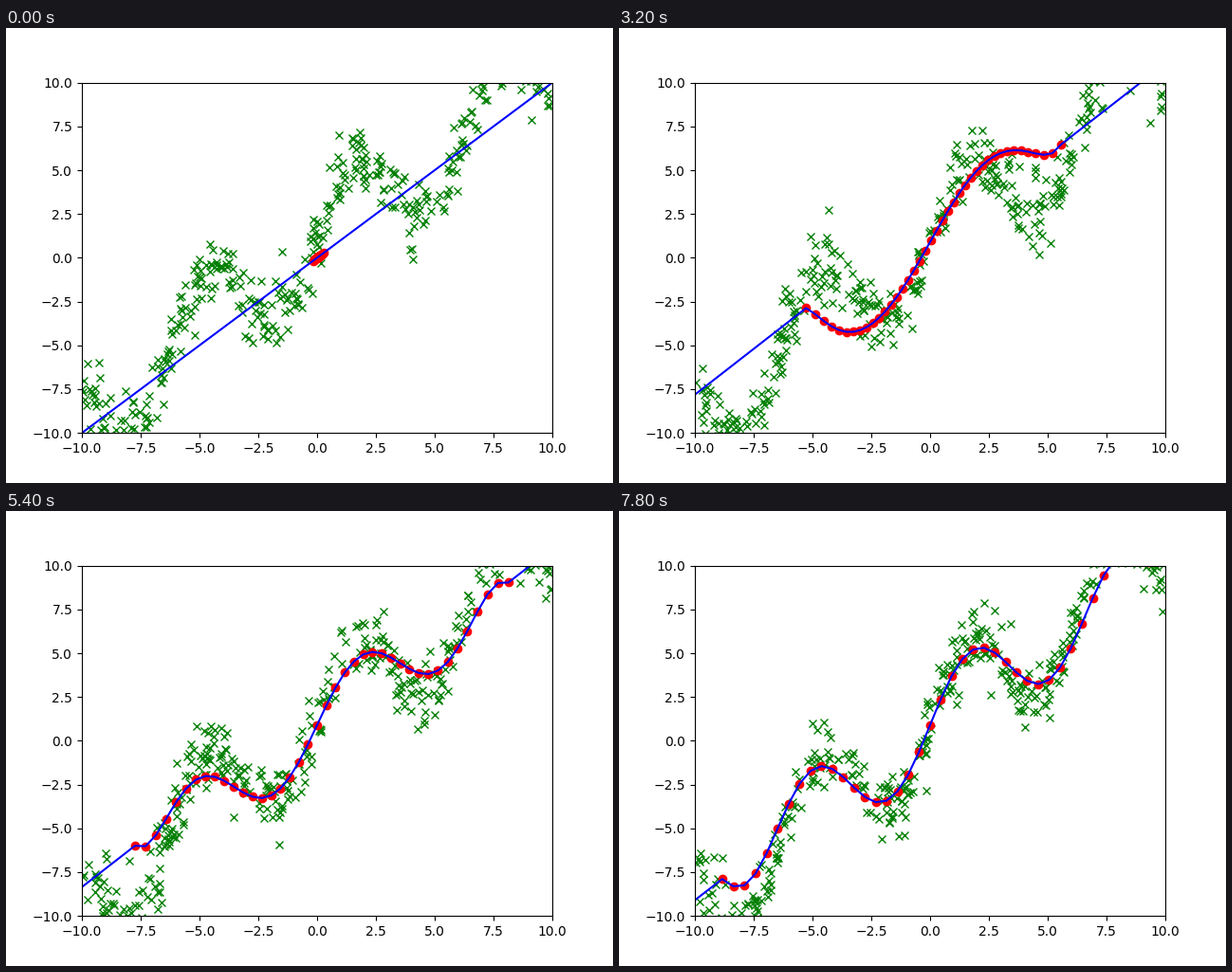
A matplotlib script for the animation above (8000 ms loop, 640 by 480 pixels).

```python
import numpy as np
import matplotlib.pyplot as plt
from matplotlib.animation import FuncAnimation

FRAMES = 40
NODES = 40
SAMPLES = 400

# Key points of the chain's wave: step, height, amplitude, frequency, left lift
KEYS = np.array([
    (0, 0.0, 0.0, 0.85, 0.0),
    (5, 1.77, 0.15, 0.85, 0.0),
    (11, 0.83, 0.95, 0.85, 1.4),
    (16, 0.9, 2.2, 0.63, 1.5),
    (22, 0.9, 1.8, 0.87, 1.4),
    (32, 0.9, 2.4, 0.91, 0.3),
    (39, 0.9, 2.5, 0.93, 0.05),
])


def chain_at(step):
    """Nodes spread out from the middle while the wave takes shape."""
    height, amp, freq, lift = (np.interp(step, KEYS[:, 0], col)
                               for col in KEYS.T[1:])
    grow = np.sin(np.pi / 2 * step / FRAMES)
    u = np.linspace(-1, 1, NODES)
    crowd = 0.8 * np.exp(-step / 9)
    v = (1 - crowd) * u + crowd * np.sign(u) * u ** 4
    x = 0.05 + 0.17 * grow + (0.22 + 8.85 * grow) * v
    wave = amp * np.sin(freq * x) * (1 - v ** 8)
    return x, x + height + wave + lift * np.maximum(-v, 0) ** 8


def extend(x, y, slope):
    """Continue the chain in a straight line past both edges."""
    ends = np.array([-12, 12])
    left, right = y[[0, -1]] + slope * (ends - x[[0, -1]])
    return np.r_[ends[0], x, ends[1]], np.r_[left, y, right]


def samples_at(step):
    rng = np.random.RandomState(100 + step)
    x = rng.uniform(-10, 10, SAMPLES)
    return x, 1 + x + 3 * np.sin(x) + rng.normal(0, 1, SAMPLES)


fig, ax = plt.subplots(figsize=(6.4, 4.8), dpi=100)
ax.set_xlim(-10, 10)
ax.set_ylim(-10, 10)
data, = ax.plot([], [], "gx")
dots, = ax.plot([], [], "ro")
curve, = ax.plot([], [], "b-")


def update(step):
    x, y = chain_at(step)
    data.set_data(*samples_at(step))
    dots.set_data(x, y)
    curve.set_data(*extend(x, y, 1 + 0.045 * min(step / 11, 1)))
    return data, dots, curve


anim = FuncAnimation(fig, update, frames=FRAMES, interval=200,
                     repeat=True, repeat_delay=0)
plt.show()
```
